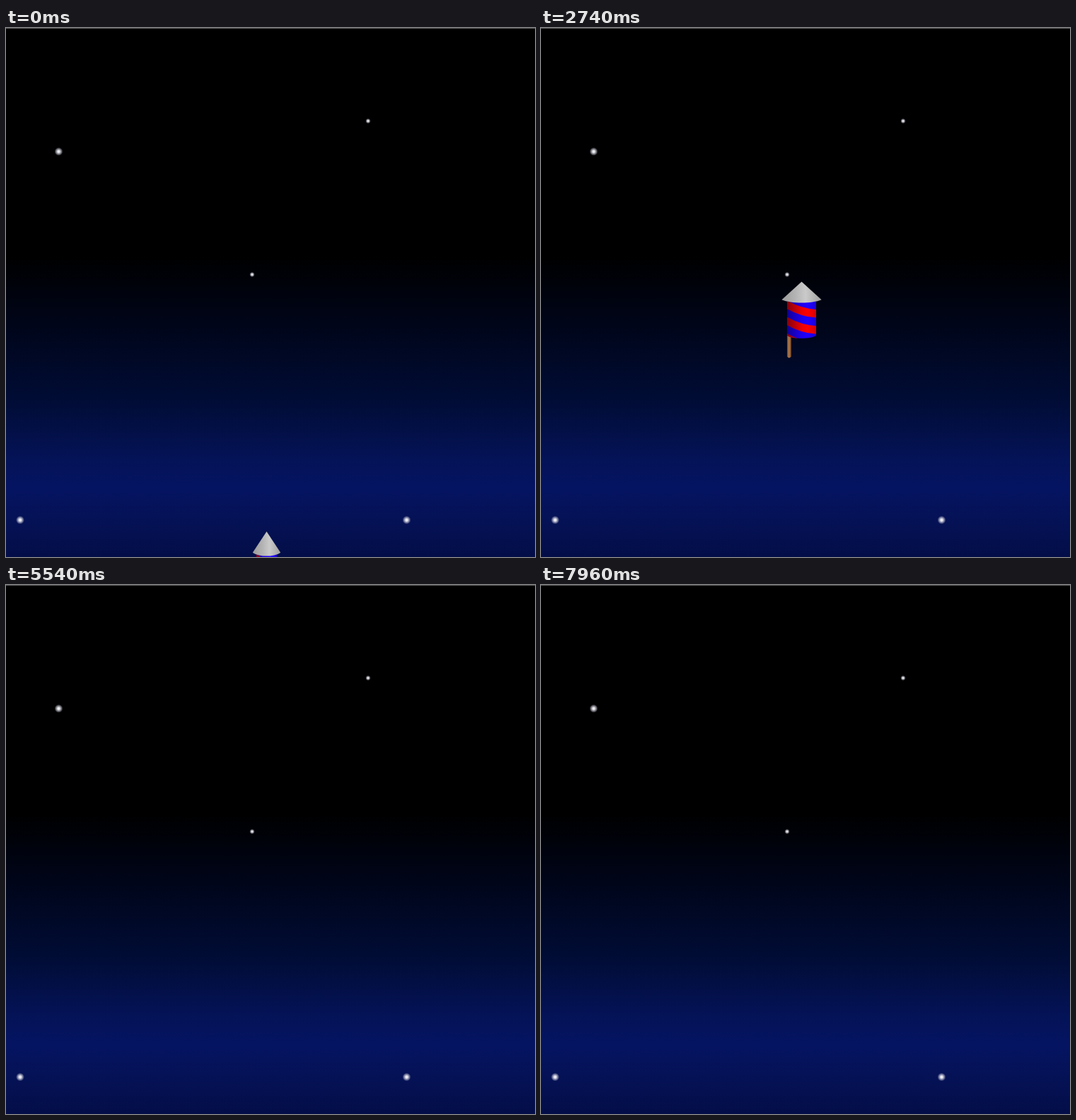
Recreate the animation shown at these times as an HTML page with a canvas. Size 748 px wide and 748 px high, loop 8 s.

```html
<!DOCTYPE html>
<html lang="en">
<head>
<meta charset="utf-8">
<title>Firework rocket</title>
<style>
  html, body { margin: 0; width: 100%; height: 100%; overflow: hidden; background: #000; }
  canvas { display: block; width: 100%; height: 100%; }
</style>
</head>
<body>
<canvas id="stage" width="748" height="748"></canvas>
<script>
const SIZE = 748, LOOP = 8000, CX = 368.5, BURST_Y = 213.5;
const LAUNCH = { start: 1711, length: 2745 };
const BURST = { start: 4456, length: 1081, reach: 523 };
const BLUE = '#2000ff', RED = '#ff0000';
const ctx = document.getElementById('stage').getContext('2d');

const mix = (a, b, p) => a + (b - a) * p;
const clamp = v => Math.min(1, Math.max(0, v));

// Same curve as CSS "ease": cubic-bezier(.25, .1, .25, 1).
function ease(x) {
  if (x <= 0 || x >= 1) return clamp(x);
  let lo = 0, hi = 1;
  for (let i = 0; i < 24; i++) {
    const s = (lo + hi) / 2;
    if (0.75 * s * (1 - s) + s ** 3 < x) lo = s; else hi = s;
  }
  return 0.3 * lo * (1 - lo) ** 2 + 3 * lo * lo * (1 - lo) + lo ** 3;
}

// Evenly spaced poses are shown in an uneven 20, 20, 100 ms rhythm.
function poseTime(t) {
  const group = Math.floor((t - 80) / 140);
  const rest = t - 80 - group * 140;
  const sub = rest < 20 ? 0 : rest < 40 ? 1 : 2;
  return 80 + group * 140 + sub * 140 / 3;
}

function gradient(x0, y0, x1, y1, stops) {
  const g = ctx.createLinearGradient(x0, y0, x1, y1);
  for (const [at, color] of stops) g.addColorStop(at, color);
  return g;
}

function drawSky() {
  const at = y => y / SIZE;
  ctx.fillStyle = gradient(0, 0, 0, SIZE, [
    [0, '#000'], [at(322), '#000'], [at(420), '#000519'], [at(535), '#010d38'],
    [at(600), '#041254'], [at(650), '#051462'], [at(690), '#051257'], [1, '#030e48']
  ]);
  ctx.fillRect(0, 0, SIZE, SIZE);
  ctx.fillStyle = '#555';
  ctx.fillRect(0, 0, SIZE, 1);
}

function drawStar(x, y, r) {
  const g = ctx.createRadialGradient(x, y, 0, x, y, r);
  g.addColorStop(0, '#fff');
  g.addColorStop(0.3, 'rgba(240,240,245,.9)');
  g.addColorStop(0.7, 'rgba(190,190,205,.5)');
  g.addColorStop(1, 'rgba(160,160,180,0)');
  ctx.fillStyle = g;
  ctx.beginPath();
  ctx.arc(x, y, r, 0, 7);
  ctx.fill();
}

function drawRocket(p) {
  const w = mix(39.4, 65.5, p), h = mix(125, 98.5, p);
  const top = mix(774.5, BURST_Y, p) - h / 2;
  const X = v => CX + v * w, Y = v => top + v * h;
  const left = X(-0.365), right = X(0.365);

  // Stick
  const stickRight = X(-0.262);
  ctx.fillStyle = gradient(left, 0, stickRight, 0,
    [[0, '#6e4526'], [0.45, '#b07a4c'], [1, '#704728']]);
  ctx.beginPath();
  ctx.moveTo(left, Y(0.6));
  ctx.lineTo(stickRight, Y(0.6));
  ctx.lineTo(stickRight, Y(0.98));
  ctx.quadraticCurveTo((left + stickRight) / 2, Y(1.02), left, Y(0.98));
  ctx.fill();

  // Striped body
  ctx.save();
  ctx.beginPath();
  ctx.moveTo(left, Y(0.2));
  ctx.lineTo(right, Y(0.2));
  ctx.lineTo(right, Y(0.705));
  ctx.bezierCurveTo(X(0.25), Y(0.755), X(-0.25), Y(0.755), left, Y(0.705));
  ctx.clip();
  ctx.fillStyle = BLUE;
  ctx.fillRect(left, Y(0.2), right - left, h);
  ctx.fillStyle = RED;
  for (let k = -1; k < 3; k++) {
    const a = 0.365 + 0.215 * k, b = a + 0.107;
    ctx.beginPath();
    ctx.moveTo(left, Y(a - 0.115));
    ctx.quadraticCurveTo(X(0), Y(a - 0.01), right, Y(a));
    ctx.lineTo(right, Y(b));
    ctx.quadraticCurveTo(X(0), Y(b - 0.01), left, Y(b - 0.115));
    ctx.fill();
  }
  ctx.fillStyle = gradient(left, 0, right, 0, [
    [0, 'rgba(0,0,30,.48)'], [0.5, 'rgba(0,0,30,.08)'],
    [0.7, 'rgba(0,0,30,0)'], [1, 'rgba(0,0,30,.15)']
  ]);
  ctx.fillRect(left, Y(0.2), right - left, h);
  ctx.restore();

  // Nose cone
  ctx.fillStyle = gradient(X(-0.5), 0, X(0.5), 0,
    [[0, '#9c9c9c'], [0.35, '#b4b4b4'], [0.6, '#cacaca'], [1, '#a0a0a0']]);
  ctx.beginPath();
  ctx.moveTo(CX, top);
  ctx.lineTo(X(0.5), Y(0.237));
  ctx.bezierCurveTo(X(0.25), Y(0.29), X(-0.25), Y(0.29), X(-0.5), Y(0.237));
  ctx.fill();
}

function drawBurst(x) {
  const outer = BURST.reach * ease(x), inner = outer * 0.391;
  ctx.save();
  ctx.translate(CX, BURST_Y);
  ctx.globalAlpha = clamp((1 - x) / 0.2);
  ctx.strokeStyle = BLUE;
  ctx.lineWidth = outer * 0.0255;
  ctx.beginPath();
  for (let i = 0; i < 12; i++) {
    const c = Math.cos(i * Math.PI / 6), s = Math.sin(i * Math.PI / 6);
    ctx.moveTo(inner * c, inner * s);
    ctx.lineTo(outer * c, outer * s);
  }
  ctx.stroke();
  ctx.restore();
}

function draw() {
  const t = poseTime(performance.now() % LOOP);
  drawSky();
  for (const [x, y] of [[74.5, 174.7], [20, 695.7], [566.5, 695.7]]) drawStar(x, y, 6);
  for (const [x, y] of [[512, 131.5], [348, 348.6]]) drawStar(x, y, 3.7);

  const burst = (t - BURST.start) / BURST.length;
  if (burst < 0) drawRocket(ease((t - LAUNCH.start) / LAUNCH.length));
  else if (burst < 1) drawBurst(burst);
  requestAnimationFrame(draw);
}
draw();
</script>
</body>
</html>
```
